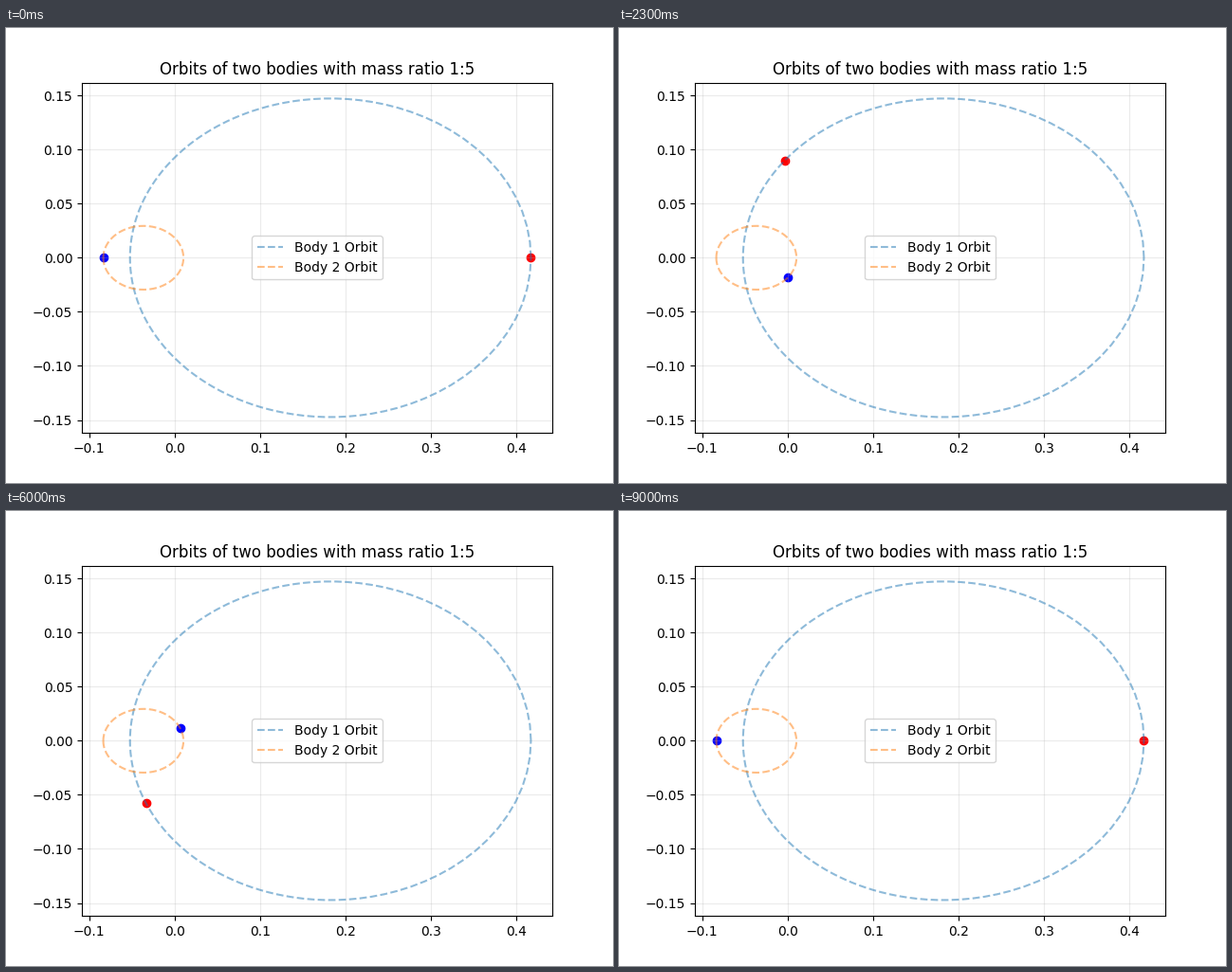
A matplotlib script for the animation above (9050 ms loop, 640 px wide and 480 px high).

```python
import numpy as np
import matplotlib.pyplot as plt
from matplotlib.animation import FuncAnimation

RATIO = 5                 # mass of body 2 over mass of body 1
R_FAR, R_NEAR = 0.5, 0.0625
FRAMES = 181

ecc = (R_FAR - R_NEAR) / (R_FAR + R_NEAR)
theta = np.linspace(0, 2 * np.pi, FRAMES)
r = R_FAR * (1 - ecc) / (1 - ecc * np.cos(theta))
separation = np.column_stack([r * np.cos(theta), r * np.sin(theta)])

body1 = separation * RATIO / (1 + RATIO)
body2 = -separation / (1 + RATIO)

fig, ax = plt.subplots(figsize=(6.4, 4.8), dpi=100)
ax.plot(*body1.T, "--", alpha=0.5, label="Body 1 Orbit")
ax.plot(*body2.T, "--", alpha=0.5, label="Body 2 Orbit")
ax.set_xlim(ax.get_xlim())
ax.set_ylim(ax.get_ylim())
dot1 = ax.scatter(*body1[0], color="red")
dot2 = ax.scatter(*body2[0], color="blue")
ax.set_title("Orbits of two bodies with mass ratio 1:5")
ax.grid(alpha=0.25)
ax.legend(loc="center")


def update(i):
    dot1.set_offsets(body1[i])
    dot2.set_offsets(body2[i])
    return dot1, dot2


anim = FuncAnimation(fig, update, frames=FRAMES, interval=50,
                     repeat=True, repeat_delay=0)
plt.show()
```
